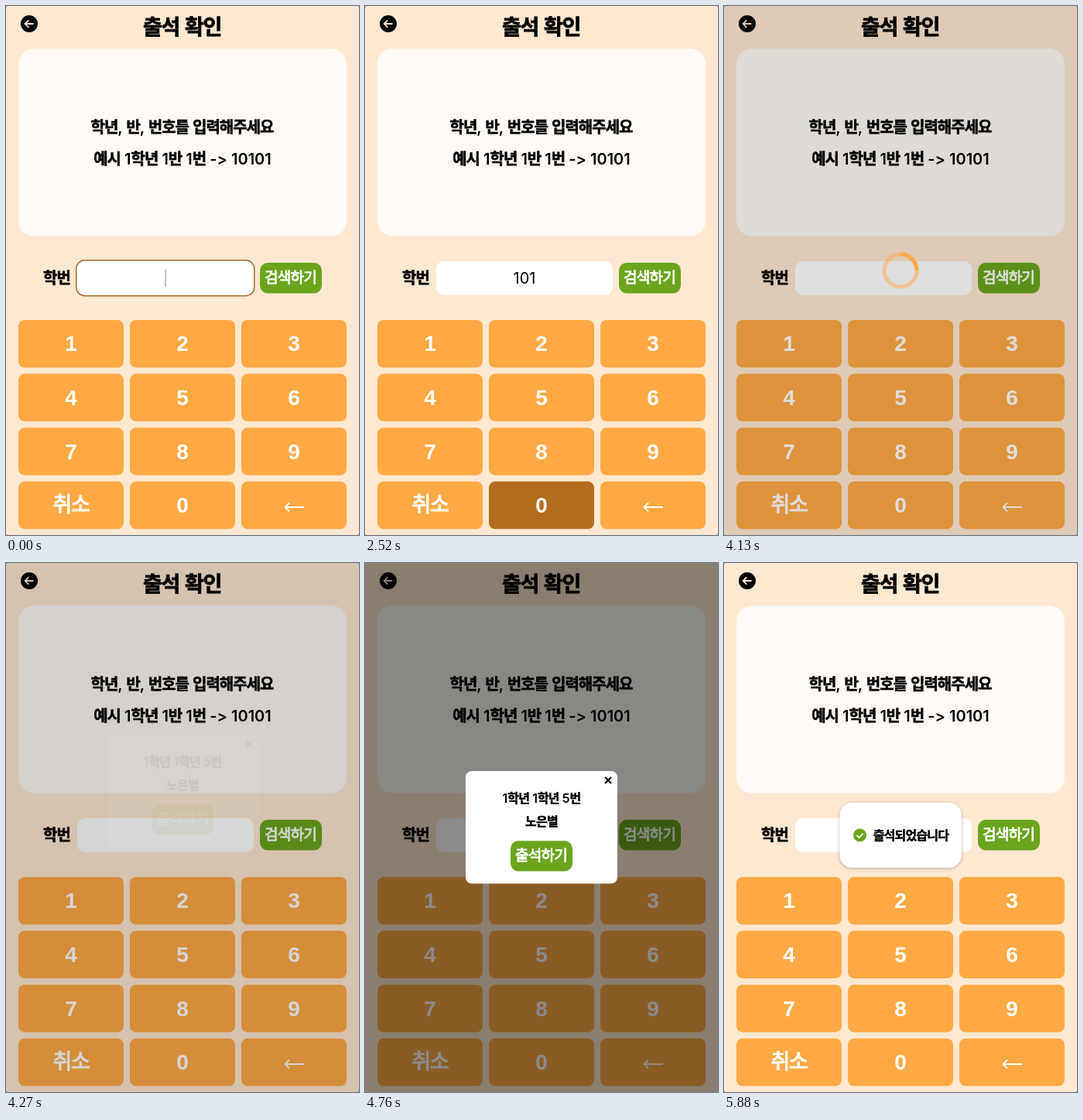
An HTML page that plays this animation: 456x684 px, repeating every 6930 ms.

```html
<!DOCTYPE html>
<html lang="ko">
<head>
<meta charset="utf-8">
<style>
  html, body { margin: 0; width: 100%; height: 100%; overflow: hidden; background: #9a8e83; }
  svg { display: block; width: 456px; height: 684px; }
  text { font-family: Inter, "Noto Sans CJK KR", "Noto Sans CJK JP", "Noto Sans CJK", sans-serif; font-weight: 500; text-anchor: middle; fill: currentColor; }
  .ko { letter-spacing: -.05em; stroke: currentColor; stroke-width: .028em; }
  .digits { font-weight: 600; }
  .key { font: bold 28px "Liberation Sans", Arial, sans-serif; color: #fff; }
  .strong { color: #fff; }
  .strong .ko { stroke-width: .042em; }
</style>
</head>
<body>
<svg viewBox="0 0 456 684">
  <defs>
    <filter id="soft" x="-20%" y="-20%" width="140%" height="150%">
      <feDropShadow dx="0" dy="1" stdDeviation="2" flood-color="#000" flood-opacity=".3"/>
    </filter>
  </defs>
  <rect width="456" height="684" rx="3" fill="#ffe8d1"/>
  <circle cx="30" cy="23" r="11"/>
  <path d="M35.5 23H25M29.3 18.3L24.6 23L29.3 27.7" fill="none" stroke="#ffe8d1" stroke-width="1.8"/>
  <rect x="16" y="55" width="424" height="242.5" rx="20" fill="#fffaf5"/>
  <rect x="92" y="330" width="228" height="44" rx="10" fill="#fff"/>
  <g id="focus">
    <rect x="90.75" y="328.75" width="230" height="46" rx="11" fill="#fff" stroke="#a8692a" stroke-width="1.5"/>
    <path d="M206 341V363" stroke="#888"/>
  </g>
  <rect x="328" y="332" width="80" height="39.5" rx="10" fill="#6aa51c"/>
  <g id="labels"></g>
  <text id="value" x="206" y="359.3" font-size="20" style="font-weight:400"></text>
  <g id="keys"></g>
  <path d="M385 648H360.5M366 642.5L360.5 648L366 653.5" fill="none" stroke="#fff" stroke-width="1.8"/>
  <rect id="shade" width="456" height="684" rx="3"/>
  <g id="spinner" fill="none" stroke="#ffa945" stroke-width="5">
    <circle cx="228" cy="342" r="21" stroke-opacity=".5"/>
    <path d="M228 321A21 21 0 0 1 249 342"/>
  </g>
  <g id="modal">
    <rect x="130" y="269" width="196" height="145.5" rx="8" fill="#fff"/>
    <path d="M310 277L318 285M318 277L310 285" stroke="#000" stroke-width="2"/>
    <rect x="188" y="359.3" width="80" height="39.2" rx="10" fill="#6aa51c"/>
  </g>
  <g id="toast">
    <rect x="149.5" y="310" width="157" height="84" rx="16" fill="#fff" filter="url(#soft)"/>
    <circle cx="175.5" cy="352" r="8.5" fill="#6aa51c"/>
    <path d="M171.5 352.2L174.5 355.2L179.7 349.5" fill="none" stroke="#fff" stroke-width="1.8"/>
  </g>
</svg>
<script>
const $ = id => document.getElementById(id);
const clamp = v => Math.max(0, Math.min(1, v));
const easeOut = p => 1 - (1 - p) ** 3;
const LOOP = 6930, STEP = 70;

// Korean runs get tighter tracking and a slight stroke for a medium weight.
const label = (parent, str, x, y, size, cls = 'digits') => {
  const body = str.replace('>', '&gt;').replace(/[가-힣]+/g, '<tspan class="ko">$&</tspan>');
  $(parent).insertAdjacentHTML('beforeend',
    `<text x="${x}" y="${y}" font-size="${size}" class="${cls}">${body}</text>`);
};
label('labels', '출석 확인', 227.5, 36.6, 27);
label('labels', '학년, 반, 번호를 입력해주세요', 227.5, 164.2, 20);
label('labels', '예시 1학년 1반 1번 -> 10101', 228, 205, 20);
label('labels', '학번', 65.5, 359.3, 20);
label('labels', '검색하기', 367.5, 358.3, 19.2, 'strong');
label('modal', '1학년 1학년 5번', 228, 310, 16);
label('modal', '노은별', 228, 339.5, 16);
label('modal', '출석하기', 227.5, 385.3, 19.2, 'strong');
label('toast', '출석되었습니다', 241.5, 358, 16);

const keyRects = {};
['1', '2', '3', '4', '5', '6', '7', '8', '9', '취소', '0', '←'].forEach((name, i) => {
  const x = 16 + i % 3 * 144, y = 406 + Math.floor(i / 3) * 69.6;
  $('keys').insertAdjacentHTML('beforeend',
    `<rect x="${x}" y="${y}" width="136" height="61.5" rx="8"/>`);
  keyRects[name] = $('keys').lastChild;
  if (name === '취소') label('keys', name, x + 68, y + 39.6, 27, 'strong');
  else if (name !== '←') label('keys', name, x + 68, y + 40.3, 28, 'key');
});

// Each press darkens a key, then the digit appears one step later.
const presses = [[70, '1'], [700, '0'], [1820, '1'], [2520, '0'], [3290, '5']];
const SEARCH = 4130, OPEN = 4270, CLOSE = 5250, TOAST = 5600;

function draw(t) {
  for (const rect of Object.values(keyRects)) rect.setAttribute('fill', '#ffa945');
  let value = '';
  for (const [at, digit] of presses) {
    if (t >= at && t < at + STEP) keyRects[digit].setAttribute('fill', '#b36d1e');
    if (t >= at + STEP) value += digit;
  }
  $('value').textContent = t < SEARCH ? value : '';
  $('focus').style.display = t < STEP ? '' : 'none';

  const loading = t >= SEARCH && t < OPEN;
  $('spinner').style.display = loading ? '' : 'none';
  $('spinner').setAttribute('transform', `rotate(${(t - SEARCH) * .36} 228 342)`);

  const leave = clamp((t - CLOSE + STEP) / 350);
  const shade = t < SEARCH ? 0 : loading ? .13 : .165 + .295 * clamp((t - OPEN) / 280);
  $('shade').setAttribute('opacity', shade * (1 - leave));

  const show = t < OPEN ? 0 : .05 + .95 * clamp((t - OPEN) / 210);
  const lift = -47 * (1 - easeOut(clamp((t - OPEN) / 420))) - 47 * leave * leave;
  $('modal').setAttribute('opacity', show * (1 - leave));
  $('modal').setAttribute('transform', `translate(0 ${lift})`);

  $('toast').setAttribute('opacity', clamp((t - TOAST) / 280));
}

const start = performance.now();
function frame() {
  const t = (performance.now() - start) % LOOP;
  draw(Math.floor(t / STEP) * STEP);
  requestAnimationFrame(frame);
}
frame();
</script>
</body>
</html>
```
